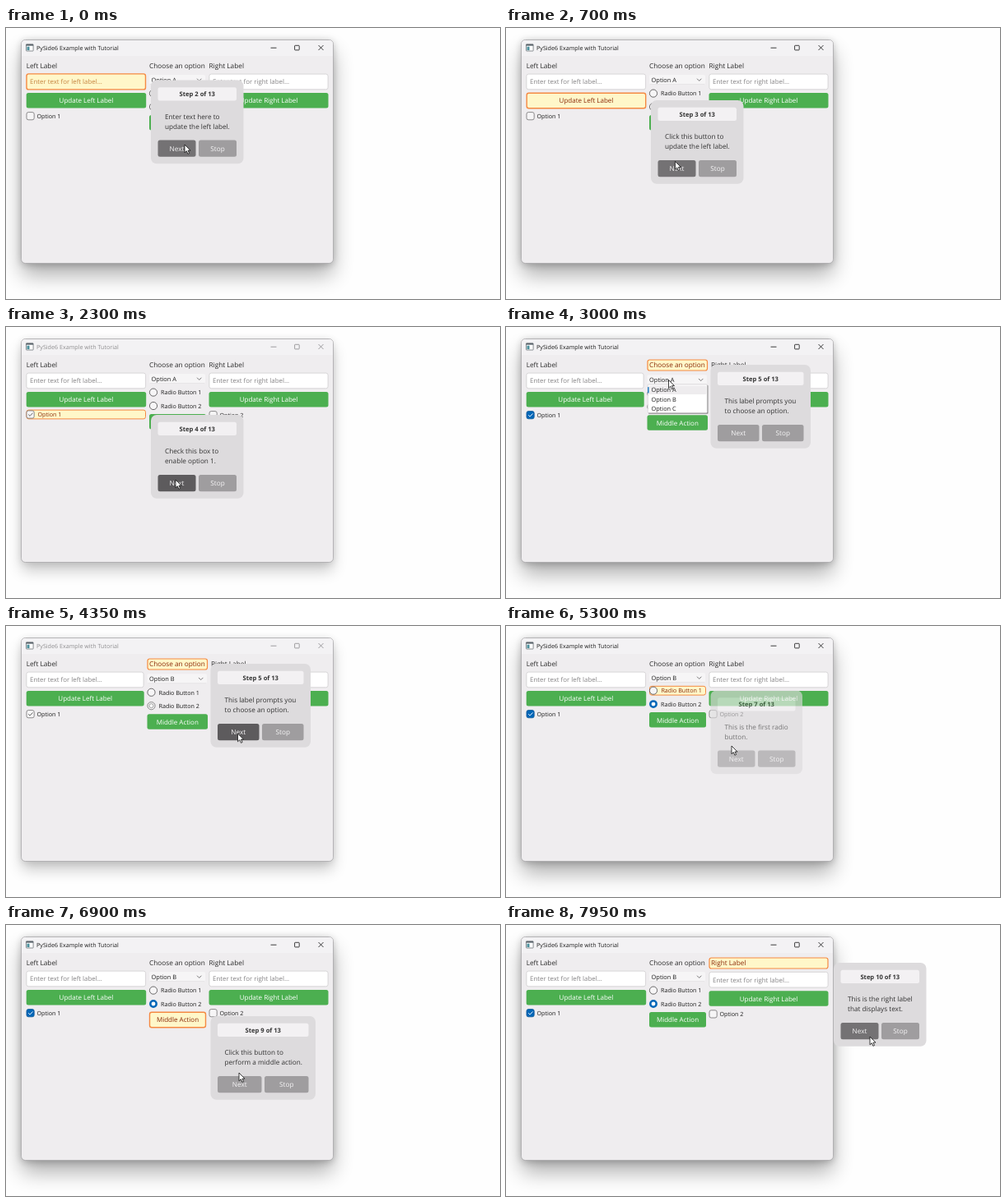
An HTML page that plays this animation: 600 by 330 pixels, repeating every 8000 ms.

```html
<!DOCTYPE html>
<html lang="en">
<head>
<meta charset="utf-8">
<title>Guided tour of a form window</title>
<style>
html, body { margin: 0; width: 100%; height: 100%; overflow: hidden; background: #fefefe; }
svg { display: block; width: 100vw; height: 100vh; }
text { font-family: "Open Sans", "Noto Sans", sans-serif; white-space: pre; text-rendering: geometricPrecision; }
</style>
</head>
<body>
<svg viewBox="0 0 600 330">
  <defs>
    <filter id="wide" x="-20%" y="-20%" width="140%" height="150%"><feGaussianBlur stdDeviation="13"/></filter>
    <filter id="mid" x="-20%" y="-20%" width="140%" height="150%"><feGaussianBlur stdDeviation="9"/></filter>
    <filter id="near" x="-10%" y="-10%" width="120%" height="120%"><feGaussianBlur stdDeviation="5"/></filter>
  </defs>
  <g id="strong">
    <rect x="19" y="29" width="378" height="272" rx="5" opacity=".31" filter="url(#wide)"/>
    <rect x="19" y="16" width="378" height="272" rx="5" opacity=".24" filter="url(#near)"/>
  </g>
  <g id="weak">
    <rect x="19" y="25" width="378" height="272" rx="5" opacity=".2" filter="url(#mid)"/>
    <rect x="19" y="16" width="378" height="272" rx="5" opacity=".12" filter="url(#near)"/>
  </g>
  <rect x="18.5" y="14.5" width="379" height="272" rx="5" fill="#efedef" stroke="#a9a8aa" stroke-width=".8"/>
  <path d="M19 34V19.5Q19 15 23.5 15H392.5Q397 15 397 19.5V34Z" fill="#f3f2f4"/>
  <g id="scene"></g>
</svg>
<script>
const LOOP = 8000, OUT = 100, SWAP = 270, FADE = 250;
const GREEN = '#4caf50', BLUE = '#0067b8', HOT = '#8a2a08', INK = '#2b2b2b';
const byId = id => document.getElementById(id);

// Each step: number, moment its Next is pressed, popup left, top, width, two lines.
const steps = [
  [2, 50, 176, 63.5, 112.5, 'Enter text here to', 'update the left label.'],
  [3, 1325, 176, 88, 112.5, 'Click this button to', 'update the left label.'],
  [4, 2200, 176, 107, 112.5, 'Check this box to', 'enable option 1.'],
  [5, 4260, 248.5, 46, 121.5, 'This label prompts you', 'to choose an option.'],
  [6, 4870, 248.5, 62.5, 121.5, 'Select an option from', 'the dropdown menu.'],
  [7, 5700, 248.5, 78.5, 111.5, 'This is the first radio', 'button.'],
  [8, 6370, 248.5, 95, 111.5, 'This is the second', 'radio button.'],
  [9, 7020, 248.5, 111, 127.5, 'Click this button to', 'perform a middle action.'],
  [10, 9000, 398, 46, 112.5, 'This is the right label', 'that displays text.']
].map(([n, press, x, y, w, ...lines]) => ({ n, press, x, y, w, lines }));
steps.forEach((s, i) => s.start = i ? steps[i - 1].press + SWAP : -1000);

// Pointer stops: time, x, y
const path = [
  [0, 217, 142], [300, 217, 142], [750, 205, 163], [1720, 205, 163], [2030, 206, 186],
  [2400, 206, 186], [2880, 197.5, 64.5], [3080, 197.5, 64.5], [3280, 200, 87], [3440, 200, 87],
  [3620, 193, 96], [3720, 193, 96], [3850, 237, 111], [3900, 237, 111], [4200, 281.5, 131],
  [4480, 281.5, 131], [4740, 274, 146], [5340, 274, 146], [5600, 277, 160], [5950, 277, 160],
  [6250, 281, 174], [6700, 281, 174], [6900, 283, 180], [6990, 283, 189], [7120, 283, 189],
  [7380, 400, 115], [7720, 400, 115], [7950, 442, 136]
];

const clamp = v => Math.max(0, Math.min(1, v));
const smooth = v => v * v * (3 - 2 * v);

function pointer(t) {
  const i = path.findIndex(p => p[0] > t);
  if (i < 0) return path[path.length - 1].slice(1);
  const [a, b] = [path[i - 1], path[i]];
  const k = smooth((t - a[0]) / (b[0] - a[0]));
  return [a[1] + (b[1] - a[1]) * k, a[2] + (b[2] - a[2]) * k];
}

const text = (x, y, size, str, fill = INK, extra = '') =>
  `<text x="${x}" y="${y}" font-size="${size}" fill="${fill}" ${extra}>${str}</text>`;
const mid = (x, y, size, str, fill, extra = '') => text(x, y, size, str, fill, 'text-anchor="middle" ' + extra);
const box = (x, y, w, h, r, fill, stroke = 'none', sw = .8) =>
  `<rect x="${x}" y="${y}" width="${w}" height="${h}" rx="${r}" fill="${fill}" stroke="${stroke}" stroke-width="${sw}"/>`;
const line = (d, stroke, sw = .9) => `<path d="${d}" fill="none" stroke="${stroke}" stroke-width="${sw}"/>`;
const glow = (x, y, w, h, sw = 1.2) => box(x + .5, y + .5, w - 1, h - 1, 2.5, '#fff7c9', '#f58a42', sw);

function label(x, y, w, str, hot) {
  return hot ? glow(x, 39.5, w, 14) + text(x + 2.5, y, 8.25, str, HOT) : text(x, y, 8.25, str);
}

function button(x, y, w, str, hot) {
  return (hot ? glow(x, y - .3, w, 19.6, 1.4) : box(x, y, w, 18.5, 2.5, GREEN)) +
    mid(x + w / 2, y + 12.4, 8, str, hot ? HOT : '#fff');
}

function field(x, y, w, str, hot) {
  return (hot ? glow(x, y - .3, w, 20, 1.4) : box(x + .4, y + .4, w - .8, 18.7, 2.5, '#fff', '#cfcdcf')) +
    text(x + 4.6, y + 12.7, 7.85, str, hot ? '#c5843f' : '#858385');
}

function check(x, y, str, on, active, hot, w) {
  const fill = on && active ? BLUE : '#f6f5f6';
  return (hot ? glow(x, y - 5.9, w, 11.8, 1) : '') +
    box(x + .5, y - 4.6, 9.2, 9.2, 2.2, fill, on && active ? '#0a5596' : '#717071') +
    (on ? line(`M${x + 2.7} ${y}l1.9 1.9 3.4 -3.7`, active ? '#fff' : '#555') : '') +
    text(x + (hot ? 14 : 13), y + 2.7, 7.15, str, hot ? HOT : '#1c1c1c');
}

function radio(x, y, str, on, active, hot) {
  const ring = (r, fill, stroke, sw) =>
    `<circle cx="${x + 5}" cy="${y}" r="${r}" fill="${fill}" stroke="${stroke}" stroke-width="${sw}"/>`;
  const dot = !on ? ring(4.6, '#f6f5f6', '#4b4a4b', .8)
    : active ? ring(3.7, '#fff', BLUE, 2.5)
    : ring(4.6, '#f6f5f6', '#6f6e6f', .8) + ring(2.5, '#fff', '#777', .7);
  return (hot ? glow(x, y - 5.9, 69, 11.8, 1) : '') + dot +
    text(x + (hot ? 14.4 : 14), y + 2.7, 7.15, str, hot ? HOT : '#1c1c1c');
}

function titleBar(active) {
  const ink = active ? '#1d1d1d' : '#8f8e90';
  return box(24.5, 19.8, 8.6, 8.2, .5, '#fff', '#6c7378', .8) + box(24.5, 19.8, 8.6, 1.8, 0, '#59636b') +
    box(25.5, 22.7, 3, 4.4, 0, '#4b8f9c') +
    text(37, 26.7, 7.15, 'PySide6 Example with Tutorial', ink) +
    line('M321.5 24.2h7M379.5 21l6 6m0 -6l-6 6', ink, .85) + box(350.6, 21.3, 5.6, 5.6, .7, 'none', ink, .85);
}

function dropdown(x, t) {
  const over = t < 3200 ? 0 : 1;
  const items = ['A', 'B', 'C'].map((c, i) =>
    (i === over ? box(x + 2, 71.5 + i * 11.3, 70, 10.6, 1.5, '#eeecee') : '') +
    text(x + 5, 79.4 + i * 11.3, 7.35, 'Option ' + c, '#1c1c1c')).join('');
  return box(x + 1.4, 70.8, 72.6, 35, 1, '#8b898b') + box(x + .8, 70, 72, 34.6, 1, '#fff', '#c9c7c9', .5) +
    items + box(x + .7, 73, 1.3, 7.5, .6, BLUE);
}

function form(t, n, active) {
  const wide = n === 5 ? 1 : 0;
  const leftW = wide ? 143 : 145.5;
  const mx = wide ? 171.5 : 174, mw = wide ? 73.5 : 69;
  const rx = wide ? 249 : 246.5, rw = 391.5 - rx;
  const down = n === 10 ? 1.2 : 0, my = wide * 1.2, up = n === 7 ? .9 : 0;
  const comboHot = n === 6, ink = comboHot ? HOT : '#1c1c1c';
  const choice = t < 3400 ? 'A' : 'B';
  return label(24.7, 49, 145, 'Left Label') +
    field(24.5, 55.7, leftW, 'Enter text for left label...', n === 2) +
    button(24.7, 79, leftW, 'Update Left Label', n === 3) +
    check(24.5, n === 4 ? 106.5 : 107.2, 'Option 1', t >= steps[2].start, active, n === 4, 145.5) +
    label(mx, 49, mw, 'Choose an option', n === 5) +
    (comboHot ? glow(mx, 57, mw, 12, 1) : box(mx, 57 + my, mw - 1, 11.5, 2, '#f6f5f6') +
      line(`M${mx + 1} ${68.5 + my}h${mw - 3}`, '#dad8da', .5)) +
    text(mx + 2.6, 65.6 + my, 7.4, 'Option ' + choice, ink) +
    line(`M${mx + mw - 11} ${61.7 + my}l2.7 2.7 2.7 -2.7`, '#5b5a5b', .8) +
    radio(mx, 79.6 + my - up, 'Radio Button 1', false, active, n === 7) +
    radio(mx, 96 + my - up, 'Radio Button 2', t >= 3680, active, n === 8) +
    button(mx, 106 + my - up, mw, 'Middle Action', n === 9) +
    label(rx, 49, rw, 'Right Label', n === 10) +
    field(rx, 55.7 + down, rw, 'Enter text for right label...') +
    button(rx, 79 + down, rw, 'Update Right Label') +
    check(rx, 107.2 + down, 'Option 2', false, active) +
    (t >= 2950 && t < 3400 ? dropdown(mx, t) : '');
}

function popup(s, t, px, py) {
  const { x, y, w } = s;
  const alpha = clamp((t - s.start) / FADE) * (1 - clamp((t - s.press - OUT) / (SWAP - OUT)));
  if (!alpha) return '';
  const bw = (w - 20.5) / 2, bx = x + 8.5, by = y + 73;
  const over = px >= bx && px <= bx + bw && py >= by && py <= by + 20;
  const tone = t >= s.press ? '#5d5b5d' : over ? '#747274' : '#9f9d9f';
  const action = (ax, str, fill) => box(ax, by, bw, 20.3, 2.5, fill) + mid(ax + bw / 2, y + 86.1, 8.2, str, '#f6f5f6');
  return `<g opacity="${alpha}">` + box(x, y, w, 101.7, 7, '#dddbdd') +
    box(bx, y + 8.8, w - 17, 16.2, 2.5, '#f3f1f3') +
    mid(x + w / 2, y + 19.6, 7.6, `Step ${s.n} of 13`, '#333', 'font-weight="700"') +
    s.lines.map((str, i) => text(x + 17, y + 47.3 + i * 12, 8.2, str, '#333')).join('') +
    action(bx, 'Next', tone) + action(bx + bw + 3.5, 'Stop', '#9f9d9f') + '</g>';
}

function draw(t) {
  const step = steps.filter(s => s.start <= t).pop();
  const active = t < step.press;
  const [px, py] = pointer(t);
  byId('strong').style.display = active ? '' : 'none';
  byId('weak').style.display = active ? 'none' : '';
  byId('scene').innerHTML = titleBar(active) + form(t, step.n, active) + popup(step, t, px, py) +
    `<path transform="translate(${px} ${py})" d="M0 0V9.8L2.3 7.7 3.9 11.3 5.6 10.5 4 7.1H7Z" fill="#fff" stroke="#111" stroke-width=".8"/>`;
}

function tick() {
  draw(performance.now() % LOOP);
  requestAnimationFrame(tick);
}
tick();
</script>
</body>
</html>
```
